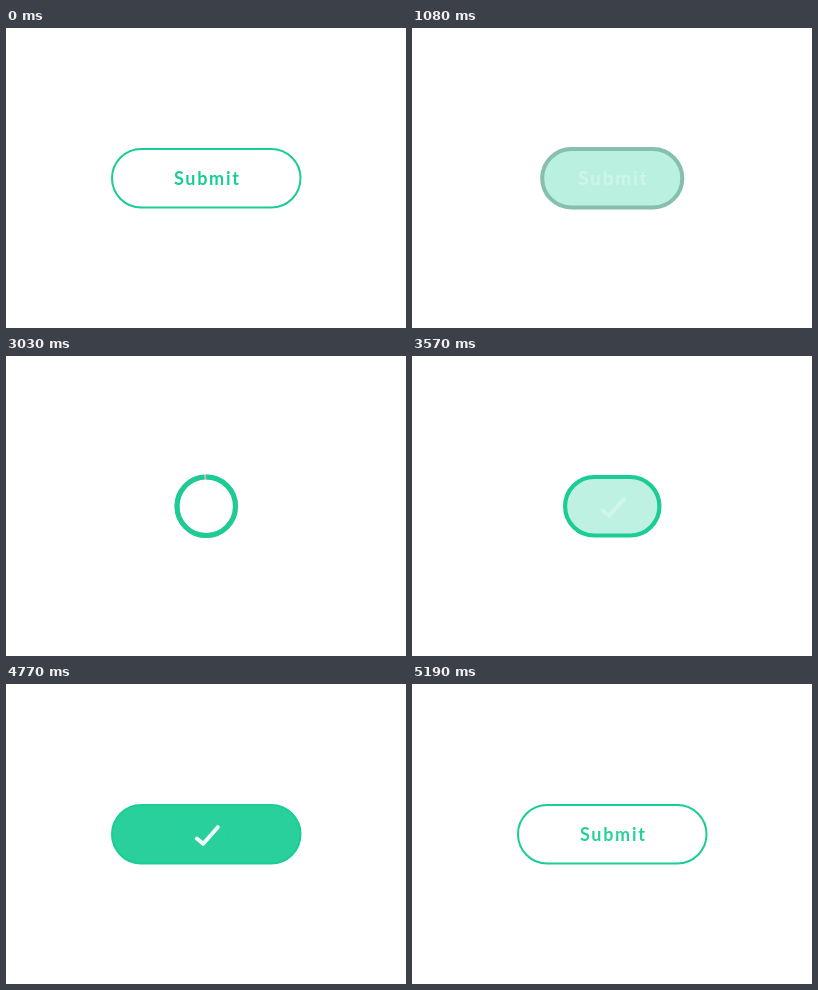
These frames come from a looping animation (400x300 px, 5.22 s). An HTML page:

```html
<!DOCTYPE html>
<html lang="en">
<head>
<meta charset="utf-8">
<title>Submit button</title>
<style>
  html, body { margin: 0; width: 100%; height: 100%; overflow: hidden; background: #fff; }
  svg { display: block; width: 400px; height: 300px; }
  text { font: 700 18px Lato, Inter, sans-serif; letter-spacing: 1.7px; text-anchor: middle; }
</style>
</head>
<body>
<svg viewBox="0 0 400 300">
  <rect id="fill" fill="#19cd95"/>
  <rect id="outline" fill="none"/>
  <circle id="ring" cx="200.25" cy="150.25" r="29.25" fill="none" stroke="#19cd95" stroke-width="5"
    pathLength="100" transform="rotate(-90 200.25 150.25)"/>
  <g id="label"><text x="1" y="6.75">Submit</text></g>
  <path id="check" d="M190.8 154.5L197.2 159.8L211.8 143.2" fill="none" stroke="#fff"
    stroke-width="4" stroke-linecap="round" stroke-linejoin="round"/>
</svg>
<script>
const LOOP = 5220, STEP = 30;
const CX = 200.25, CY = 150.25, HEIGHT = 58.5, WIDE = 188.5;
const GREEN = [25, 205, 149], GREY = [184, 184, 184], WHITE = [255, 255, 255];
const el = id => document.getElementById(id);
const [fill, outline, ring, label, check] = ['fill', 'outline', 'ring', 'label', 'check'].map(el);

// Timing curve with control points (x1, 0) and (x2, 1)
const curve = (x1, x2) => x => {
  let lo = 0, hi = 1;
  for (let i = 0; i < 24; i++) {
    const s = (lo + hi) / 2, r = 1 - s;
    if (3 * r * r * s * x1 + 3 * r * s * s * x2 + s ** 3 < x) lo = s; else hi = s;
  }
  return lo * lo * (3 - 2 * lo);
};
const linear = x => x;
const inOut = curve(0.42, 0.58);
const load = curve(0.73, 0.15);

const span = (t, from, to, ease = inOut) =>
  ease(Math.min(1, Math.max(0, (t - from) / (to - from))));
const mix = (a, b, p) => a + (b - a) * p;
const blend = (a, b, p) => `rgb(${a.map((v, i) => mix(v, b[i], p)).join()})`;

function set(node, attrs) {
  for (const key in attrs) node.setAttribute(key, attrs[key]);
}

function pill(node, width, attrs) {
  set(node, {
    x: CX - width / 2, y: CY - HEIGHT / 2, width, height: HEIGHT, rx: HEIGHT / 2, ...attrs
  });
}

function draw(t) {
  const hover = span(t, 300, 570);
  const fade = span(t, 750, 1290);
  const shrink = span(t, 925, 1290);
  const progress = span(t, 1290, 3330, load);
  const grow = span(t, 3450, 3780);
  const clear = span(t, 4740, 5160, linear);
  const reset = span(t, 4740, 5220, linear);
  const loading = t >= 1290 && t < 3450;
  const done = t >= 3450;

  const width = mix(WIDE, HEIGHT, done ? 1 - grow : shrink);
  const solid = done ? grow * (1 - clear) : 0.96 * hover * (1 - fade);
  pill(fill, width, { 'fill-opacity': solid });
  pill(outline, width, {
    stroke: done ? blend(GREEN, GREEN, 0) : blend(GREEN, GREY, fade),
    'stroke-width': mix(2, 5, done ? 1 - grow : fade)
  });

  set(ring, {
    visibility: loading && progress > 0 ? 'visible' : 'hidden',
    'stroke-dasharray': `${progress * 100} 200`
  });

  const scale = done ? 1 : mix(1, 1.06, hover);
  set(label, {
    transform: `translate(${CX} ${CY}) scale(${scale})`,
    fill: done ? blend(GREEN, GREEN, 0) : blend(GREEN, WHITE, hover),
    opacity: done ? reset : 1 - fade
  });
  set(check, { opacity: grow * (1 - reset) });
}

const start = performance.now();
function tick() {
  const t = (performance.now() - start) % LOOP;
  draw(Math.floor(t / STEP) * STEP);
  requestAnimationFrame(tick);
}
draw(0);
requestAnimationFrame(tick);
</script>
</body>
</html>
```
